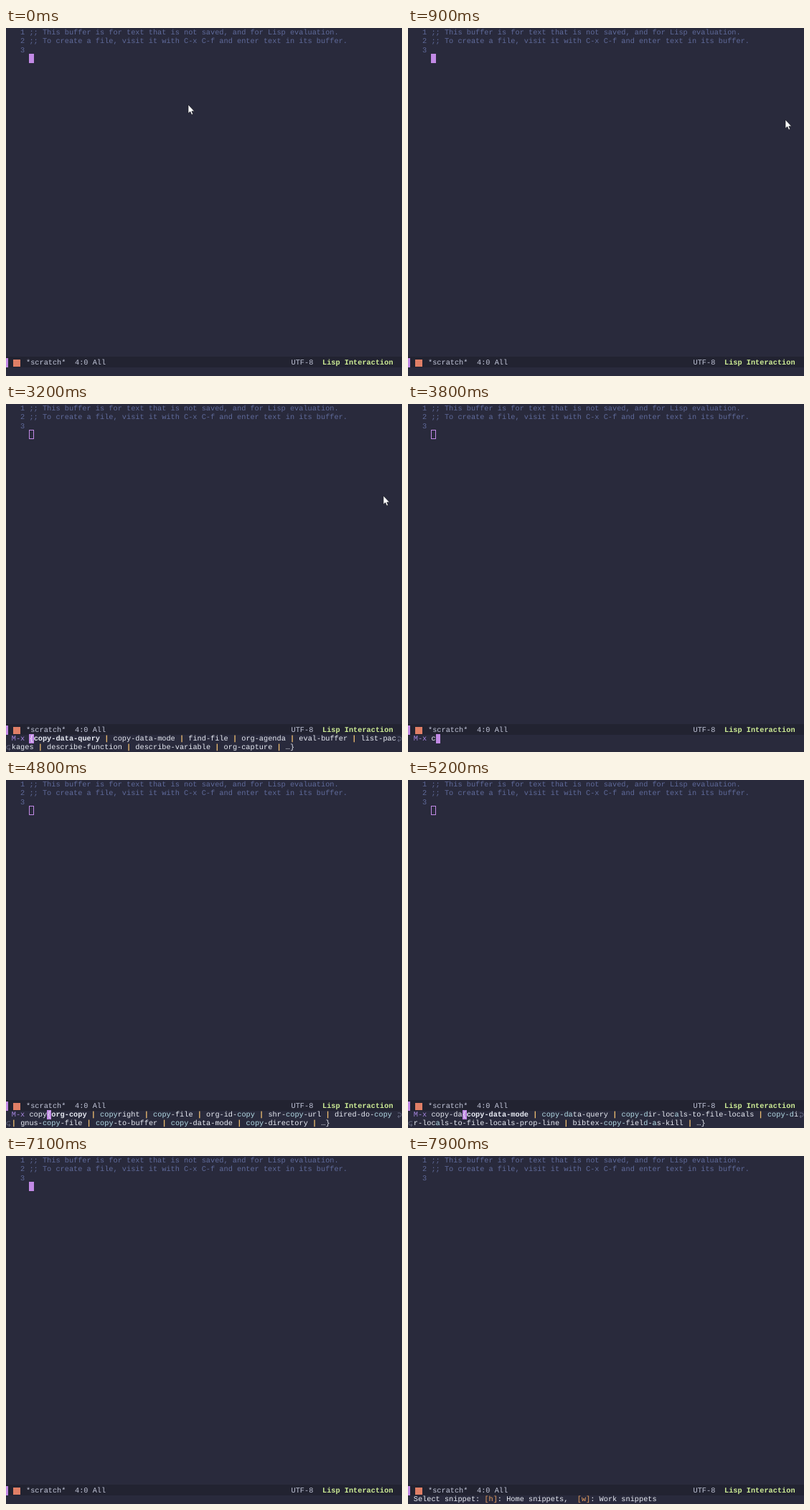
Recreate the animation shown at these times as an HTML page. Size 552x486 px, loop 8 s.

```html
<!DOCTYPE html>
<html lang="en">
<head>
<meta charset="utf-8">
<title>Command completion</title>
<style>
  :root { --cw: 6.164px; --row: 12.33px; --left: 7.8px; --purple: #c28ae6; }
  html, body { margin: 0; width: 552px; height: 486px; overflow: hidden; background: #292a3c; }
  #stage {
    position: relative; width: 552px; height: 486px; overflow: hidden;
    font: 10.273px/var(--row) "Liberation Mono", monospace;
    text-rendering: geometricPrecision; font-kerning: none; font-variant-ligatures: none;
    color: #e9ecf4; white-space: pre;
  }
  #stage div, svg { position: absolute; }
  .text { left: var(--left); }
  #buffer { top: 1px; color: #5f6a9a; }
  .cursor { width: var(--cw); height: var(--row); box-sizing: border-box; background: var(--purple); }
  .cursor.hollow { background: none; border: 1px solid var(--purple); }
  #point { left: calc(var(--left) + 4 * var(--cw)); top: 36.4px; }
  #foot { left: 0; top: 459px; width: 552px; height: 40px; background: #292a3c; }
  #foot.tall { top: 446.67px; }
  #mode { left: 0; top: 0; width: 552px; height: 15px; background: #222331; color: #c3c7da; }
  #mode div { top: 3.2px; }
  #mode #tab { left: 0; top: 2px; width: 3px; height: 13px; background: var(--purple); }
  #mode #icon { left: 10px; top: 4px; width: 10px; height: 10px; background: #e07f66; }
  #major { color: #cfee96; }
  #mini { top: 15.2px; }
  #caret { top: 14.8px; }
  b, #major, .s { font-weight: bold; }
  .p { color: #a686de; }
  .m { color: #b4dbe6; }
  .s { color: #ecbc70; }
  .k { color: #eaa05f; }
  .wrap { fill: none; stroke: #62667f; stroke-width: 1; }
</style>
</head>
<body>
<div id="stage">
  <div id="buffer" class="text">  1 ;; This buffer is for text that is not saved, and for Lisp evaluation.
  2 ;; To create a file, visit it with C-x C-f and enter text in its buffer.
  3</div>
  <div id="point" class="cursor"></div>
  <div id="foot">
    <div id="mode">
      <div id="tab"></div><div id="icon"></div>
      <div style="left:28px">*scratch*</div>
      <div style="left:96px">4:0 All</div>
      <div style="left:397.5px">UTF-8</div>
      <div id="major" style="left:441px">Lisp Interaction</div>
    </div>
    <div id="caret" class="cursor"></div>
    <div id="mini" class="text"></div>
    <svg id="wraps" class="wrap" style="left:0;top:14px" width="552" height="27">
      <path d="M546 4h3q2 0 2 2.500t-2 2.500h-3m2-2l-2 2 2 2"/>
      <path d="M6 16h-3q-2 0-2 2.500t2 2.500h3m-2-2l2 2-2 2"/>
    </svg>
  </div>
  <svg id="mouse" width="12" height="18" viewBox="-1 -1 12 18">
    <path d="M0 0V12.300L2.800 9.800 4.700 14.200 6.700 13.300 4.900 9.200H8.600Z" fill="#fff" stroke="#15161f" stroke-width=".7"/>
  </svg>
</div>
<script>
const LOOP = 8000, COLS = 87, CELL = 6.164, LEFT = 7.8;
const $ = id => document.getElementById(id);

const recent = 'copy-data-query copy-data-mode find-file org-agenda eval-buffer list-packages describe-function describe-variable org-capture …';
const onCopy = 'org-copy copyright copy-file org-id-copy shr-copy-url dired-do-copy gnus-copy-file copy-to-buffer copy-data-mode copy-directory …';
const dirLocals = 'copy-dir-locals-to-file-locals', propLine = dirLocals + '-prop-line';
const data = 'copy-data-mode copy-data-query ';
const onData = data + dirLocals + ' ' + propLine;

// start, typed text, candidates
const typing = [
  [2200, ''], [2700, '', recent], [3800, 'c'], [4000, 'co'], [4200, 'cop'],
  [4400, 'cop', onCopy], [4700, 'copy'], [4800, 'copy', onCopy],
  [4900, 'copy-'], [5000, 'copy-', data + 'copy-file copy-to-buffer copy-directory copy-to-register gnus-copy-file …'],
  [5100, 'copy-d'], [5200, 'copy-da', onData + ' bibtex-copy-field-as-kill …'],
  [5400, 'copy-dat', onData], [5600, 'copy-data', onData],
  [5900, 'copy-data-'], [6200, 'copy-data-', data + propLine],
  [6300, 'copy-data-q'], [6400, 'copy-data-q', 'copy-data-query'],
  [6500, 'copy-data-qu'], [6600, 'copy-data-qu', 'copy-data-query'], [7100, null]
];

// start, x, y
const moves = [[0, 254, 107], [500, 253.6, 107], [700, 330, 124], [800, 455, 136], [900, 526, 128]];

const at = (list, t) => list.filter(s => s[0] <= t).pop();
const within = (t, from, to) => t >= from && t < to;

// Marks the letters of a candidate that match the input in order
function match(name, input) {
  let i = 0;
  return [...name].map(ch => ch === input[i] ? (i++, ['m', ch]) : ['', ch]);
}

function candidates(input, list) {
  const names = list.split(' ');
  const [open, close] = names.length > 1 ? '{}' : '()';
  const runs = [['', open]];
  names.forEach((name, i) => {
    if (i) runs.push(['', ' '], ['s', '|'], ['', ' '], ...match(name, input));
    else runs.push(['b', name]);
  });
  return [...runs, ['', close]];
}

function markup(runs) {
  let col = 0, html = '';
  for (const [cls, text] of runs) {
    let out = '';
    for (const ch of text) {
      if (col && col % COLS === 0) out += '\n';
      out += ch;
      col++;
    }
    html += cls === 'b' ? `<b>${out}</b>` : cls ? `<span class="${cls}">${out}</span>` : out;
  }
  return { html, wrapped: col > COLS };
}

const choose = [['', 'Select snippet: '], ['k', '[h]'], ['', ': Home snippets,  '],
                ['k', '[w]'], ['', ': Work snippets']];

function echo(t) {
  if (t >= 7200) return choose;
  const step = at(typing, t);
  if (!step || step[1] === null) return [];
  const [, input, list] = step;
  return [['p', 'M-x '], ['', input], ...(list ? candidates(input, list) : [])];
}

let shown;
function draw(t) {
  const active = within(t, 2200, 7100);
  const { html, wrapped } = markup(echo(t));
  if (html !== shown) $('mini').innerHTML = shown = html;
  $('wraps').style.display = wrapped ? '' : 'none';
  $('foot').className = within(t, 2700, 7100) ? 'tall' : '';

  const off = within(t, 200, 700) || within(t, 1200, 1700) || t >= 7700;
  $('point').style.display = off ? 'none' : '';
  $('point').className = active ? 'cursor hollow' : 'cursor';

  $('caret').style.display = active && !within(t, 2700, 3200) ? '' : 'none';
  if (active) $('caret').style.left = LEFT + (4 + at(typing, t)[1].length) * CELL + 'px';

  const [, x, y] = at(moves, t);
  $('mouse').style.cssText = `left:${x - 1}px;top:${y - 1}px;display:${t < 3800 ? 'block' : 'none'}`;
}

const start = performance.now();
function tick() {
  draw((performance.now() - start) % LOOP);
  requestAnimationFrame(tick);
}
tick();
</script>
</body>
</html>
```
